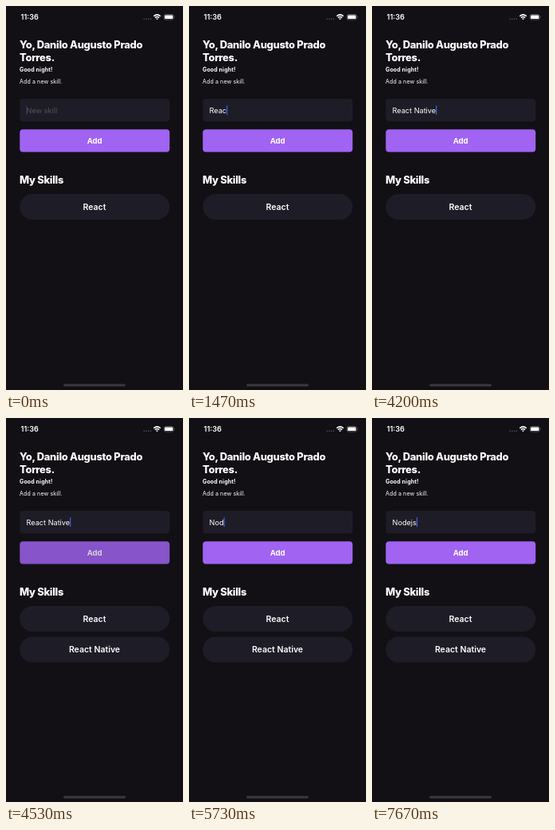
An HTML page for the animation above (8000 ms loop, 222 by 480 pixels).

```html
<!DOCTYPE html>
<html lang="en">
<head>
<meta charset="utf-8">
<title>My Skills</title>
<style>
  html, body { margin: 0; height: 100%; overflow: hidden; background: #121015; }
  svg { display: block; width: 222px; height: 480px; }
  text { font-family: Inter, Roboto, sans-serif; fill: #fff; white-space: pre; }
  .title { font-size: 12.9px; font-weight: 800; letter-spacing: -.28px; }
  .small { font-size: 7px; letter-spacing: .14px; }
  .field { font-size: 9.15px; }
  .label { font-size: 10.5px; font-weight: 600; text-anchor: middle; }
  .bold { font-weight: 700; }
  .panel { fill: #1e1d27; }
</style>
</head>
<body>
<svg viewBox="0 0 222 480">
  <rect width="222" height="480" fill="#121015"/>

  <text x="18.5" y="17.4" font-size="9.2" font-weight="600">11:36</text>
  <g fill="#58575c">
    <circle cx="173.2" cy="16.2" r=".8"/><circle cx="175.9" cy="16.2" r=".8"/>
    <circle cx="178.6" cy="16.2" r=".8"/><circle cx="181.3" cy="16.2" r=".8"/>
  </g>
  <g fill="none" stroke="#fff" stroke-width="1.5">
    <path d="M185.2 12.8Q189.5 8.9 193.8 12.8M186.9 14.7Q189.5 12.4 192.1 14.7"/>
    <path d="M188.1 15.9Q189.5 14.8 190.9 15.9L189.5 17.3Z" fill="#fff" stroke="none"/>
  </g>
  <rect x="198.2" y="10.6" width="12" height="6.4" rx="2" fill="none" stroke="#88878b" stroke-width=".6"/>
  <rect x="199.1" y="11.5" width="10.2" height="4.6" rx="1.2" fill="#fff"/>
  <path d="M211 12.7q1 1.1 0 2.2z" fill="#88878b"/>

  <text class="title" x="17" y="52.7">Yo, Danilo Augusto Prado</text>
  <text class="title" x="17" y="68.5">Torres.</text>
  <text class="small bold" x="17" y="82.3">Good night!</text>
  <text class="small" x="17" y="97.4">Add a new skill.</text>

  <rect class="panel" x="17.3" y="115.9" width="187.9" height="28.4" rx="4"/>
  <text class="field" id="field" x="25.6" y="133.6"></text>
  <rect id="caret" y="124.4" width="1.15" height="11.6" fill="#4466ee"/>

  <g id="button">
    <rect x="17.3" y="154.2" width="187.9" height="28.4" rx="4" fill="#a163f2"/>
    <text class="bold" x="111" y="171.6" font-size="9.6" letter-spacing="-.1" text-anchor="middle">Add</text>
  </g>

  <text class="title" x="17" y="221.9">My Skills</text>
  <rect class="panel" x="17.3" y="235" width="187.9" height="32" rx="16"/>
  <text class="label" x="111" y="254.8">React</text>
  <g id="added">
    <rect class="panel" x="17.3" y="273.6" width="187.9" height="32" rx="16"/>
    <text class="label" x="111" y="293.4">React Native</text>
  </g>

  <rect x="72" y="472.5" width="78" height="2.9" rx="1.45" fill="#39383d"/>
</svg>
<script>
const LOOP = 8000, BLINK = 930, BLINK_DELAY = 530;
const [field, caret, button, added] =
  ["field", "caret", "button", "added"].map(id => document.getElementById(id));

// Each typed word: the time its field was cleared, then one time per key
const words = [
  { text: "React Native", cleared: -730,
    keys: [930, 1130, 1270, 1470, 1670, 1800, 2270, 2530, 2730, 2870, 3070, 3200] },
  { text: "Nodejs", cleared: 4730, keys: [5400, 5530, 5730, 5930, 6270, 6600] },
];

const clamp = v => Math.min(1, Math.max(0, v));
const ramp = (t, from, to) => clamp((t - from) / (to - from));

function caretOpacity(sinceKey) {
  if (sinceKey < BLINK_DELAY) return 1;
  const p = (sinceKey - BLINK_DELAY) % BLINK;
  return p < 110 ? 1 - p / 110 : ramp(p, 110, 420);
}

function draw(t) {
  const { text, cleared, keys } = words[t < 4730 ? 0 : 1];
  const count = keys.filter(k => k <= t).length;
  const value = text.slice(0, count) || "New skill";
  if (field.textContent !== value) field.textContent = value;
  field.style.fill = count ? "#fff" : "#54535a";

  caret.setAttribute("x", count ? 25.6 + field.getComputedTextLength() : 25.3);
  caret.style.opacity = caretOpacity(t - (count ? keys[count - 1] : cleared));

  button.style.opacity = 1 - .18 * (ramp(t, 4440, 4530) - ramp(t, 4730, 4930));
  added.style.visibility = t < 4530 ? "hidden" : "visible";
}

const start = performance.now();
function tick() {
  draw((performance.now() - start) % LOOP);
  requestAnimationFrame(tick);
}
tick();
</script>
</body>
</html>
```
